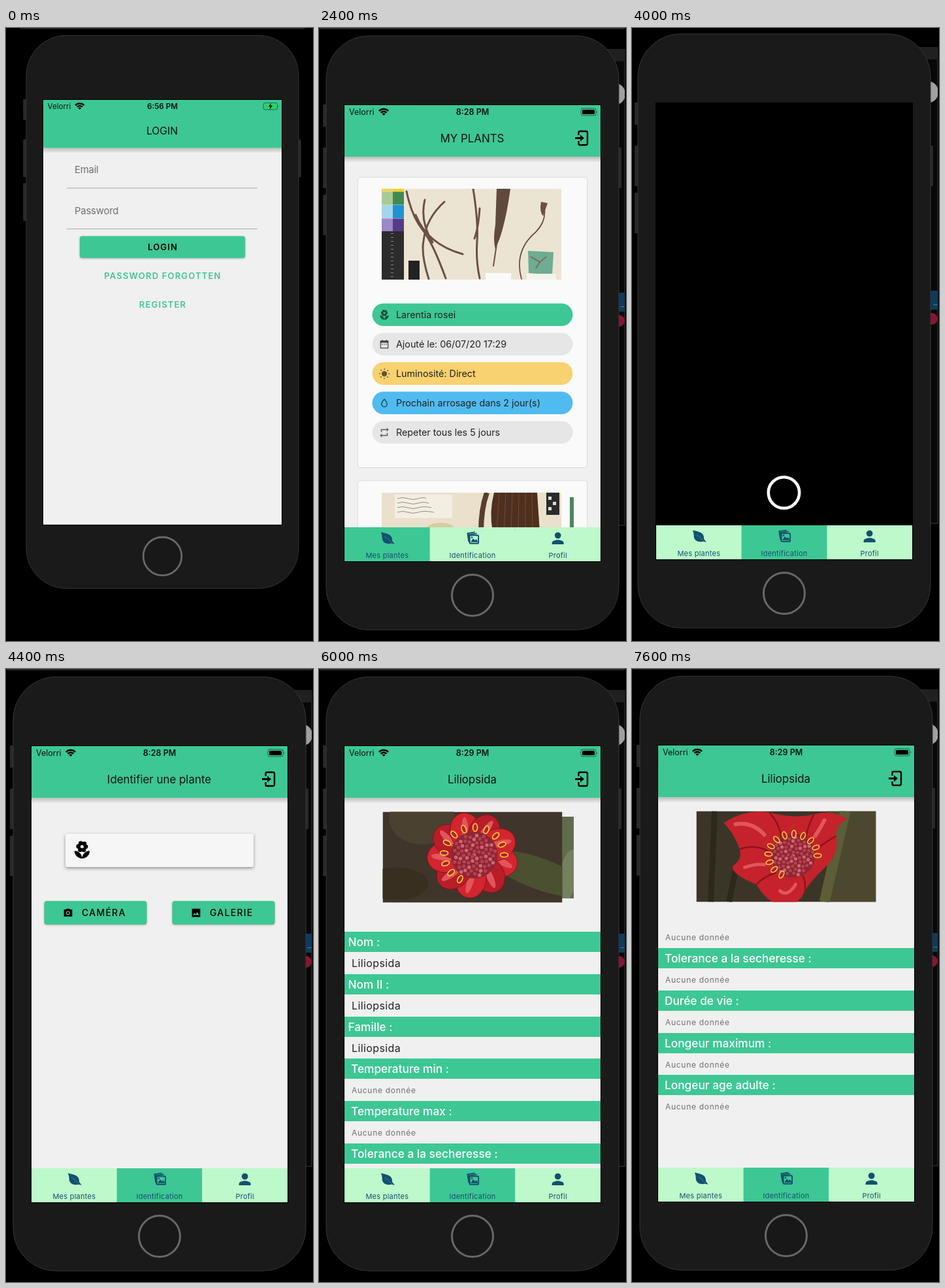
Animation, 470 px wide and 938 px high, one loop 8000 ms. Source, as an HTML page:

```html
<!DOCTYPE html>
<html lang="fr">
<head>
<meta charset="utf-8">
<title>Plant app demo</title>
<style>
html, body { margin: 0; width: 100%; height: 100%; overflow: hidden; background: #000; }
#stage { display: block; width: 100%; height: 100%; font-family: Inter, Roboto, sans-serif; }
.mid { text-anchor: middle; }
.btn { font-size: 14px; letter-spacing: 1.25px; }
.raised { filter: drop-shadow(0 1px 1.5px #0004); }
.line { fill: none; stroke: currentColor; }
</style>
</head>
<body>
<svg id="stage" viewBox="0 0 470 938"></svg>
<script>
const GREEN = '#3dc794', MINT = '#bdf9cb', PAPER = '#f0f0f0', NAVY = '#14506e', GREY = '#707070';
const W = 392, H = 698, TAB_Y = 646;

const rect = (x, y, w, h, fill, r = 0, more = '') =>
  `<rect x="${x}" y="${y}" width="${w}" height="${h}" rx="${r}" fill="${fill}" ${more}/>`;
const path = (d, more = '') => `<path d="${d}" ${more}/>`;
const line = (d, width, color = 'currentColor', more = '') =>
  path(d, `fill="none" stroke="${color}" stroke-width="${width}" ${more}`);
const circle = (x, y, r, more = '') => `<circle cx="${x}" cy="${y}" r="${r}" ${more}/>`;
const ellipse = (x, y, rx, ry, fill, turn = 0, more = '') =>
  `<ellipse rx="${rx}" ry="${ry}" fill="${fill}" transform="translate(${x} ${y}) rotate(${turn})" ${more}/>`;
const text = (x, y, s, size, fill = '#111', more = '') =>
  `<text x="${x}" y="${y}" font-size="${size}" fill="${fill}" ${more}>${s}</text>`;
const mid = (x, y, s, size, fill, more = '') => text(x, y, s, size, fill, 'class="mid" ' + more);
const box = (x, y, w, h, body) => `<svg x="${x}" y="${y}" width="${w}" height="${h}">${body}</svg>`;
const group = (x, y, body, more = '') => `<g transform="translate(${x} ${y}) ${more}">${body}</g>`;
const each = (n, f) => Array.from({ length: n }, (_, i) => f(i)).join('');

// Icons live in a 24 unit square.
const ICONS = {
  flower: circle(12, 8, 4.4, 'class="line" stroke-width="5.2" stroke-linecap="round" stroke-dasharray="0 4.607"') +
    path('M3 13a9 9 0 0 1 9 9a9 9 0 0 1 9-9a9 9 0 0 1-9 9a9 9 0 0 1-9-9z'),
  calendar: line('M4.5 5.5h15v14h-15zM8 2.5v4M16 2.5v4', 2) + path('M4 5h16v4H4zM7 11h2v2H7zM11 11h2v2h-2zM15 11h2v2h-2z'),
  sun: circle(12, 12, 5.5) +
    circle(12, 12, 9.5, 'class="line" stroke-width="2.6" stroke-linecap="round" stroke-dasharray="0 7.46"'),
  drop: line('M12 4q-5.5 6-5.5 10a5.5 5.5 0 0 0 11 0q0-4-5.5-10z', 2),
  repeat: path('M7 7h10v3l4-4-4-4v3H5v6h2zM17 17H7v-3l-4 4 4 4v-3h12v-6h-2z'),
  leaf: path('M2 2c10 2 19 4 18 14l4 5-5-1C10 22 4 18 4 11c0-4-1-7-2-9z') + line('M8 9q6 3 12 11', 1, '#3dc79488'),
  photos: line('M6 17l-2-13 12-2M7 19L6 6l13-2', 1.8) +
    rect(7.5, 7, 14, 13, 'none', 1, 'stroke="currentColor" stroke-width="2"') +
    path('M9 18l4-6 3 3 2-2 3 5z') + circle(11, 10.5, 1.3),
  person: circle(12, 8, 4.3) + path('M12 14c-3 0-8 1.5-8 4v2h16v-2c0-2.5-5-4-8-4z'),
  camera: path('M9 3L7 5H3v15h18V5h-4l-2-2zM12 8a4.5 4.5 0 1 1-.1 0z', 'fill-rule="evenodd"') + circle(12, 12.5, 2.6),
  image: path('M3 3h18v18H3zM5.5 17h13l-4-6-3.5 4.5-2.5-3z', 'fill-rule="evenodd"'),
};
const icon = (name, x, y, size, color = '#000') =>
  group(x - size / 2, y - size / 2,
    `<g fill="${color}" color="${color}">${ICONS[name]}</g>`, `scale(${size / 24})`);

function phone() {
  const key = (x, y, h) => rect(x, y, 6, h, '#292929', 1);
  return key(-33, -1, 34) + key(-33, 65, 62) + key(-33, 137, 62) + key(418, 65, 62) +
    rect(-28, -106, 448, 909, '#1a1a1a', 66, 'stroke="#363636"') +
    circle(196, 750, 31.5, 'fill="#181818" stroke="#686868" stroke-width="3"') +
    rect(-1, -1, W + 2, H + 2, '#000');
}

function desktop(x, y) {
  return rect(x - 38, 0, 506 - x, Math.max(0, y - 116), '#2a2a2a') +
    group(0, y,
      rect(430, -85, 38, 728, '#080808', 0, 'stroke="#3c3c3c"') + rect(440, -85, 28, 18, '#202020') +
      box(440, -40, 28, 400,
        ellipse(15, 23, 14, 16, '#a0a0a0') + rect(0, 327, 28, 29, '#0d3b5e') +
        text(21, 349, '...', 8, '#cde') + circle(19, 370, 9, 'fill="#8c1433"')));
}

function status(time, charging) {
  const arc = r => `M${60 - r * .72} ${16 - r * .7}A${r} ${r} 0 0 1 ${60 + r * .72} ${16 - r * .7}`;
  return text(7, 15, 'Velorri', 12.5, '#111') +
    line(arc(10), 2.5, '#000') + line(arc(6.2), 2.3, '#000') + path(arc(3.6) + 'L60 16z') +
    mid(196, 15, time, 12.5, '#111', 'font-weight="600"') +
    rect(362, 5, 23, 11, 'none', 3, 'stroke="#0008"') +
    rect(364, 7, 19, 7, charging ? '#1fdc55' : '#000', 1.5) + path('M386.5 9q2 1.5 0 3z', 'fill="#0008"') +
    (charging ? path('M375 5l-5 6h3.5l-1.5 5 5-6.5h-3.5z') : '');
}

function header(title, time, { shadow = true, exit = false, charging = false } = {}) {
  return (shadow ? each(6, i => rect(0, 79, W, 1.5 + i * 1.3, '#00000009')) : '') +
    rect(0, 0, W, 79, GREEN) + status(time, charging) + mid(195.5, 56.5, title, 16.9) +
    (exit ? line('M358.5 46v-4q0-2 2-2h9q2.5 0 2.5 2.5v16q0 2.5-2.5 2.5h-9q-2 0-2-2v-4', 2.4, '#000') +
      line('M353 50.5h9', 3, '#000') + path('M361 45.5l6 5-6 5z') : '');
}

const button = (x, y, w, label, weight = 600) =>
  rect(x, y, w, 36, GREEN, 4, 'class="raised"') +
  `<text class="mid btn" x="${x + w / 2 + .6}" y="${y + 23}" font-weight="${weight}">${label}</text>`;
const link = (y, label) =>
  `<text class="mid btn" x="196.5" y="${y}" fill="${GREEN}" font-weight="600">${label}</text>`;
const fieldLabel = (x, y, s) => text(x, y, s, 16, GREY, 'letter-spacing="-.2"');

function tabs(active) {
  const items = [['Mes plantes', 'leaf'], ['Identification', 'photos'], ['Profil', 'person']];
  const cell = W / 3;
  return items.map(([label, name], i) =>
    rect(i * cell, TAB_Y, cell + .3, 52, i === active ? GREEN : MINT) +
    icon(name, (i + .5) * cell, TAB_Y + 17, i === 2 ? 27 : 23, NAVY) +
    mid((i + .5) * cell, TAB_Y + 47, label, 11, NAVY, 'letter-spacing=".25"')).join('');
}

function login(time, charging) {
  return header('LOGIN', time, { charging }) +
    fieldLabel(51.5, 120.5, 'Email') + rect(39, 144.5, 313, 1, '#a4a4a4') +
    fieldLabel(51.5, 187.5, 'Password') + rect(39, 211.5, 313, 1, '#a4a4a4') +
    button(60, 224, 272, 'LOGIN') + link(294, 'PASSWORD FORGOTTEN') + link(341, 'REGISTER');
}

function register() {
  const fields = ['Nom', 'Prenom', 'Email', 'Password', 'confirm Password'];
  return rect(0, 79, W, 335, '#e2e2e2') +
    fields.map((s, i) => fieldLabel(13, 121 + 67 * i, s) + rect(0, 145 + 67 * i, W, 1, '#a0a0a0')).join('') +
    header('REGISTER', '8:27 PM', { shadow: false }) +
    button(21, 425, 350, 'REGISTER') + link(495, 'LOGIN');
}

function driedPlant() {
  const swatches = ['#f0d25a', '#f6d21c', '#a9cb96', '#3f8a52', '#a3d6ec', '#1f92d6', '#9d88c8', '#563c88'];
  const stem = (d, w) => line(d, w, '#6a5144', 'stroke-linecap="round"');
  return rect(0, 0, 275, 139, '#ece4d3') +
    swatches.map((c, i) => rect(i % 2 * 17, (i >> 1) * 20.5 - 16, 17, 20, c)).join('') +
    rect(0, 65, 34, 74, '#2c2c2c') + each(12, i => rect(14, 68 + i * 6, 4, 1, '#888')) +
    rect(41, 110, 17, 29, '#222') + rect(159, 129, 39, 10, '#fafafa') +
    stem('M38 4Q46 42 62 62T98 137M66 17Q58 50 78 82M96 20Q68 45 64 80Q60 100 72 138', 3) +
    stem('M52 40Q70 85 124 100M140 0Q148 50 146 80T150 137M150 30Q148 60 142 76', 3) +
    path('M176 0h21q-6 45-16 75l-7 18q-4-15 0-38z', 'fill="#604a3e"') + stem('M176 85L171 118', 2) +
    stem('M248 24Q254 48 236 66Q202 95 214 138', 1.8) + path('M244 20l10 2-7 20q-6-8-3-22z', 'fill="#6a5144"') +
    path('M224 95l39 2-2 35-36-3z', 'fill="#6dad92"') + line('M228 104l14 8 10-8M242 112l-6 10', 1.5, '#8a5a4c') +
    rect(222, 130, 45, 9, '#f6f3ea');
}

function secondPlant() {
  return rect(0, 0, 275, 139, '#eae0cb') + rect(20, 3, 88, 36, '#f3eee2') +
    each(4, i => line(`M24 ${9 + i * 7}q8-3 16 0t16 0t${12 + i * 4} 0`, 1, '#968d80')) +
    ellipse(90, 56, 22, 10, '#d8cca0') +
    path('M172 0h66l4 60h-72q-6-30 2-60z', 'fill="#4e3020"') +
    each(6, i => line(`M${180 + i * 10} 0l${i - 4} 60`, 1, '#74492e')) +
    line('M161 0Q152 25 152 60', 8, '#5a3d2c') + rect(252, 0, 20, 34, '#2b2b2b') +
    rect(255, 6, 5, 5, '#ddd') + rect(262, 14, 5, 5, '#ddd') + rect(255, 22, 5, 5, '#ddd');
}

function myPlants() {
  const chips = [
    [GREEN, 'flower', 'Larentia rosei'], ['#e6e6e6', 'calendar', 'Ajouté le: 06/07/20 17:29'],
    ['#f8d170', 'sun', 'Luminosité: Direct'], ['#50bbf0', 'drop', 'Prochain arrosage dans 2 jour(s)'],
    ['#e6e6e6', 'repeat', 'Repeter tous les 5 jours']];
  const card = y => rect(21, y, 350, 443, '#fafafa', 4, 'style="filter:drop-shadow(0 .5px 1px #0003)"');
  return header('MY PLANTS', '8:28 PM', { exit: true }) +
    card(111) + box(57, 128, 275, 139, driedPlant()) +
    chips.map(([fill, name, label], i) => {
      const y = 303.5 + 45 * i;
      return rect(42.5, y, 307, 34.5, fill, 17.25) + icon(name, 61, y + 17.5, 18, '#0009') +
        text(79, y + 22.5, label, 14.3, '#222');
    }).join('') +
    card(575) + box(57, 593, 275, 139, secondPlant()) + rect(345, 600, 6, 46, '#4c8462') + tabs(0);
}

function camera() {
  return rect(0, 0, W, H, '#000') +
    circle(195.5, 596, 23.7, 'fill="none" stroke="#fff" stroke-width="4.6"') + tabs(1);
}

function keyboard() {
  const STEP = 39.2, SHADE = '#abb3bc', DARK = '#9eb2b2';
  const key = (x, y, w, label, size = 24, fill = '#f8f8f8', ink = '#000') =>
    rect(x, y + 1, w, 44, '#868a8e', 5) + rect(x, y, w, 44, fill, 5) +
    mid(x + w / 2, y + (size > 20 ? 29.5 : 28), label, size, ink);
  const row = (letters, x, y) => [...letters].map((c, i) => key(x + i * STEP, y, 33.5, c)).join('');
  return rect(0, 426, W, 272, '#d1d5d9') + rect(0, 644, W, 54, '#cbd7d6') +
    ['«Tulip»', 'Tulipa', 'Tulips'].map((s, i) => mid(65 + i * 130.7, 458, s, 17)).join('') +
    rect(130, 437, 1, 25, '#b5b9be') + rect(260, 437, 1, 25, '#b5b9be') +
    row('azertyuiop', 3, 480) + row('qsdfghjklm', 3, 537) + row('wxcvbn’', 61.5, 593) +
    key(3, 593, 44, '', 24, SHADE) + key(345, 593, 44, '', 24, SHADE) +
    key(3, 650, 43, '123', 16, DARK) + key(52, 650, 43, '', 16, DARK) + key(100, 650, 34, '') +
    key(140, 650, 151, 'espace', 16) + key(297, 650, 92, 'rechercher', 16, '#007aff', '#fff') +
    line('M25 606l10 10h-5v8h-10v-8h-5z', 1.7, '#111', 'stroke-linejoin="round"') +
    line('M362 607h14q3 0 3 3v11q0 3-3 3h-14l-7-8.5zM365 612l7 7M372 612l-7 7', 1.6, '#111', 'stroke-linejoin="round"') +
    circle(73.5, 672, 10, 'fill="none" stroke="#111" stroke-width="1.3"') +
    ellipse(73.5, 672, 4.5, 10, 'none', 0, 'stroke="#111" stroke-width="1.2"') +
    line('M63.5 672h20M73.5 662v20M65.5 666.5h16M65.5 677.5h16', 1.1, '#111') +
    rect(114, 661, 6, 13, 'none', 3, 'stroke="#111" stroke-width="1.4"') +
    line('M111 669v2a6 6 0 0 0 12 0v-2M117 677v5M113 682h8', 1.4, '#111');
}

function identify(query) {
  const action = (x, name, label) =>
    button(x, 237, 157, '') + icon(name, x + 36.5, 255, 17) +
    `<text class="btn" x="${x + 57.5}" y="260" font-weight="500">${label}</text>`;
  return header('Identifier une plante', '8:28 PM', { exit: true }) +
    rect(52, 134, 288, 51, '#f6f6f6', 3, 'style="filter:drop-shadow(0 2px 2.5px #0006)"') +
    icon('flower', 77.5, 159, 31) +
    (query ? text(112, 166, query, 17.5) + line('M308 153l12 12M320 153l-12 12', 2, '#6a6a6a') +
      text(57, 199, query, 13.5) : '') +
    action(19.5, 'camera', 'CAMÉRA') + action(215.5, 'image', 'GALERIE') +
    (query ? keyboard() : tabs(1));
}

const polar = (deg, rx, ry) => [Math.cos(deg * Math.PI / 180) * rx, Math.sin(deg * Math.PI / 180) * ry];

// The dome of scales in the middle of a bloom, ringed with yellow loops.
function heart(rx, ry) {
  const scales = each(70, i => {
    const r = Math.sqrt(i / 70) * 33, [x, y] = polar(i * 137.5, r, r);
    return circle(x.toFixed(1), y.toFixed(1), 3.3, `fill="${i % 3 ? '#b5404e' : '#cf6670'}" stroke="#7c1c2a" stroke-width=".7"`);
  });
  const loops = each(12, i => {
    const deg = 118 + i * 22, [x, y] = polar(deg, rx, ry);
    return ellipse(x, y, 6, 3.4, '#b3202a', deg, 'stroke="#f3c13a" stroke-width="1.9"');
  });
  return circle(0, 0, 36, 'fill="#8f2634"') + scales + loops;
}

function roundBloom() {
  const petals = each(9, i => {
    const deg = i * 40 + 15, [x, y] = polar(deg, 40, 36);
    return ellipse(x, y, 30, 24, i % 2 ? '#b81d28' : '#d3252f', deg, 'stroke="#80101a" stroke-width=".8"') +
      ellipse(x * 1.15, y * 1.15, 18, 5, '#e2555a', deg + 12);
  });
  return rect(0, 0, 275, 139, '#40352a') + ellipse(240, 95, 80, 24, '#4a5030', 20) +
    ellipse(60, 10, 50, 40, '#4b4130') + ellipse(20, 110, 50, 25, '#382f20') +
    group(138, 66, petals) + group(140, 66, heart(46, 42));
}

function openBloom() {
  const shine = (d, w = 6) => line(d, w, '#e2555a', 'stroke-linecap="round"');
  return rect(0, 0, 275, 139, '#3b3527') + rect(200, 0, 75, 139, '#4c482f') +
    line('M228 0L196 139', 16, '#5d5d38') + line('M28 0L22 139M60 90L50 139', 9, '#2c291c') +
    path('M42 18Q75-4 112 2Q150 12 180 5Q205-3 232 12Q212 20 214 38Q220 66 195 88Q176 106 166 122' +
      'Q158 142 138 146Q108 142 92 112Q52 96 56 84Q72 72 66 58Q58 34 42 18z', 'fill="#c5222c"') +
    line('M66 58Q90 50 112 62M112 2Q128 20 130 40M180 5Q170 24 168 40M214 38Q196 48 182 60M92 112Q104 100 122 94M166 122Q168 106 162 98',
      2.5, '#8c131d') +
    shine('M60 20Q86 16 104 36M196 14Q190 26 182 38') + shine('M74 86Q92 80 104 82M128 122Q140 132 152 112', 5) +
    group(148, 68, heart(40, 35), 'scale(.94)');
}

function detail(scroll) {
  const labels = ['Nom', 'Nom II', 'Famille', 'Temperature min', 'Temperature max',
    'Tolerance a la secheresse', 'Durée de vie', 'Longeur maximum', 'Longeur age adulte'];
  const rows = labels.map((label, i) => {
    const y = Math.round(i * 64.8), known = i < 3;
    return rect(0, y, W, 31, GREEN) + text(known ? 5.5 : 10, y + 22, label + ' :', 17.3, '#fff', 'font-weight="500"') +
      (known ? text(11, y + 54, 'Liliopsida', 16, '#222', 'letter-spacing=".4"')
        : text(11, y + 53, 'Aucune donnée', 12, GREY, 'letter-spacing=".7"'));
  }).join('');
  const actions = button(20, 602.5, 157, 'RETOUR', 500) + button(196, 602.5, 157, 'SÉLECTIONNER', 500);
  return header('Liliopsida', '8:29 PM', { exit: true }) +
    (scroll ? '' : box(333, 108, 18, 125, rect(0, 0, 18, 125, '#5f6c4c') + ellipse(10, 90, 14, 40, '#75805e', 10))) +
    box(58.5, 100.5, 275, 139, scroll ? openBloom() : roundBloom()) +
    box(0, 284, W, 362, group(0, -scroll, rows) + (scroll ? group(0, -scroll, group(0, 286, actions)) : '')) + tabs(1);
}

// [duration, screen x, screen y, scale, page]
const scenes = [
  [800, 57, 110, 365 / W, login('6:56 PM', true)],
  [800, 42, 119, 1, register()],
  [800, 40, 118, 1, login('8:27 PM')],
  [800, 39, 118, 1, myPlants()],
  [800, 38, 120, 1, identify('')],
  [400, 37, 115, 1, camera()],
  [800, 39, 118, 1, identify('')],
  [800, 38, 118, 1, identify('Tulip')],
  [800, 39, 118, 1, detail(0)],
  [800, 41, 120, 1, detail(0)],
  [400, 40, 117, 1, detail(298)],
];
const LOOP = scenes.reduce((sum, [ms]) => sum + ms, 0);

const stage = document.getElementById('stage');
stage.innerHTML = scenes.map(([, x, y, k, page]) =>
  `<g>${k === 1 ? desktop(x, y) : rect(22, 0, 435, 1.5, '#2a2a2a')}` +
  group(x, y, phone() + box(0, 0, W, H, rect(0, 0, W, H, PAPER) + page), `scale(${k})`) + '</g>').join('');

let start = 0;
scenes.forEach(([ms], i) => {
  const end = start + ms;
  const step = (opacity, at) => ({ opacity, offset: at / LOOP, easing: 'step-end' });
  const steps = [step(1, start), step(0, end)];
  if (start > 0) steps.unshift(step(0, 0));
  if (end < LOOP) steps.push(step(0, LOOP));
  stage.children[i].animate(steps, { duration: LOOP, iterations: Infinity });
  start = end;
});
</script>
</body>
</html>
```
